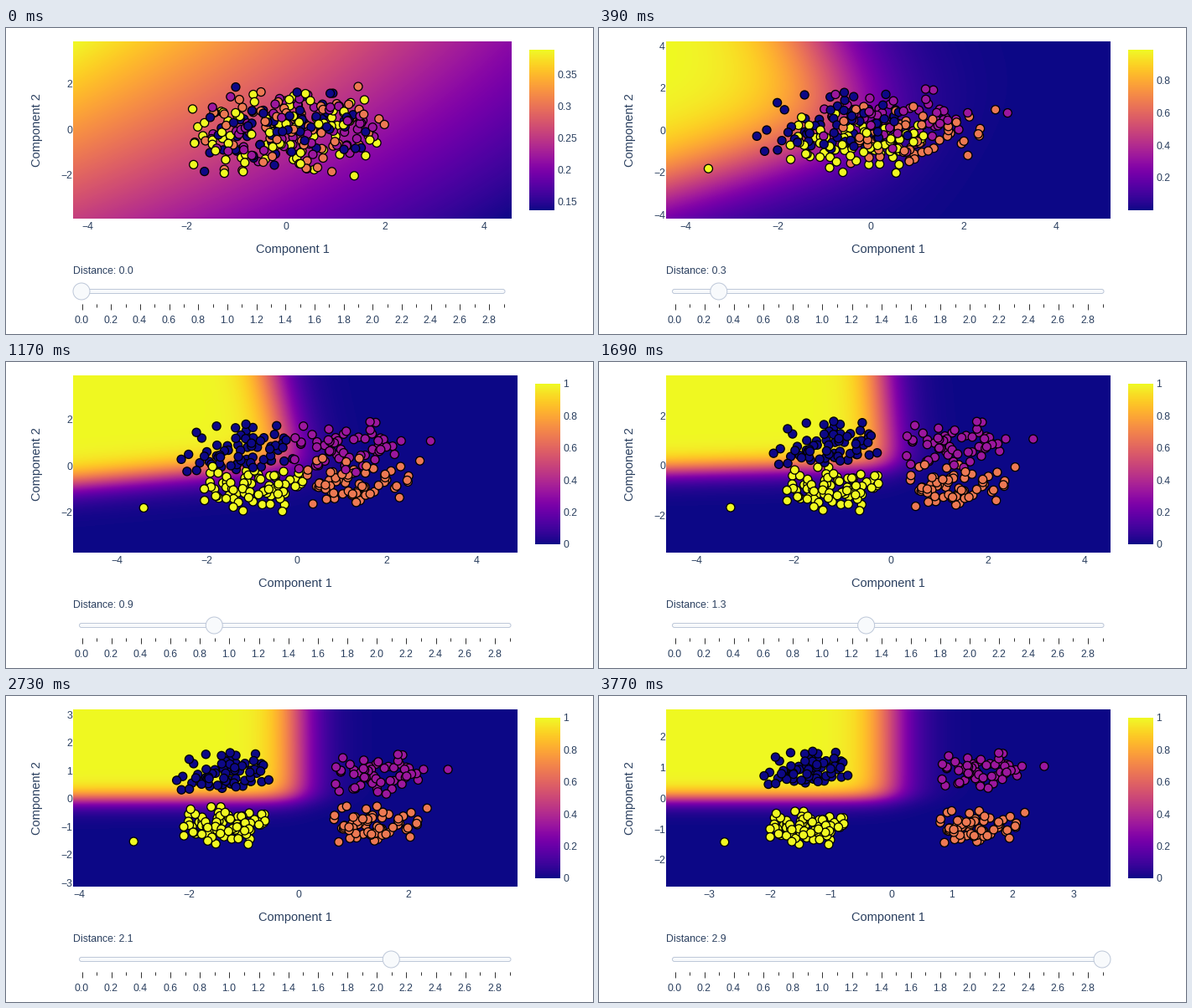
These frames come from a looping animation (700x366 px, 3900 ms). A matplotlib script:

```python
import numpy as np
import matplotlib.pyplot as plt
from matplotlib.animation import FuncAnimation
from matplotlib.patches import Circle, FancyBboxPatch

W, H, DPI = 700, 366, 100
PT = 72 / DPI
FRAMES, INTERVAL = 30, 130
LEFT, TOP, BOTTOM = 80, 16, 228
INK, RAIL, KNOB = "#2a3f5f", "#bec8d9", "#f8fafc"
CMAP = plt.get_cmap("plasma")
PER_CLASS = 70
BAR_TICKS, X_TICKS, Y_TICKS = 5.8, 7.625, 6.4

plt.rcParams["font.family"] = "Liberation Sans"

# Classes: navy, purple, orange, yellow
SIDE = np.array([-1, 1, 1, -1])
ROW = np.array([1, 1, -1, -1])


def view(d):
    """Pixel origin and pixels per unit of both axes."""
    at = [0, 0.3, 0.9, 1.7, 2.9]
    origin = [np.interp(d, at, [334, 324, 346.5, 349, 348.7]),
              np.interp(d, at, [121.5, 122.5, 124.5, 123.5, 122.5])]
    scale = [np.interp(d, at, [59.1, 55.2, 53.6, 62, 72.3]),
             np.interp(d, at, [27.3, 25.3, 27.8, 31.9, 36.7])]
    return np.array(origin), np.array(scale)


def means(d):
    """Class means after scaling to unit variance, slightly sheared."""
    d = max(d, 0.04)
    mix = d / np.sqrt(d * d + 0.45)
    shear = 10 * d * d * np.exp(-4.3 * d)
    x = 1.45 * mix * SIDE - shear * ROW
    y = 0.96 * mix * ROW + 0.6 * shear * SIDE
    return np.column_stack([x, y])


def spread(d):
    return 1 / (1 + np.array([0.62, 0.75]) * d)


def field(d, right):
    """Probability of the navy class on the pixel grid."""
    origin, scale = view(d)
    x = (np.arange(LEFT, right) + 0.5 - origin[0]) / scale[0]
    y = (origin[1] - np.arange(TOP, BOTTOM)[:, None] - 0.5) / scale[1]
    kx = 1.5 - 0.8 * np.exp(-3 * d)
    ky = 2 * np.sqrt(max(d, 0.3))
    logits = [kx * mx * (x - mx / 2) + ky * my * (y - my / 2)
              for mx, my in means(d)]
    return 1 / sum(np.exp(v - logits[0]) for v in logits)


rng = np.random.default_rng(12)
LABEL = rng.integers(0, 4, 4 * PER_CLASS)
COLORS = CMAP(LABEL / 3)


def cloud():
    return 2.2 * np.tanh(0.48 * rng.normal(size=(len(LABEL), 2)))


MIXED, NOISE = cloud(), cloud()
# One far point each for purple, orange and yellow
for label, far in [(1, (3.1, 0.35)), (2, (2.2, 1.5)), (3, (-3.75, -1.55))]:
    NOISE[np.argmax(LABEL == label)] = far


def ticks(lo, hi, count):
    """Round values between lo and hi, at most about count of them."""
    rough = (hi - lo) / count
    base = 10 ** np.floor(np.log10(rough))
    step = base * next(m for m in (1, 2, 5, 10) if rough <= m * base)
    tol = 3e-6
    return step * np.arange(np.ceil((lo - tol) / step),
                            np.floor((hi + tol) / step) + 1)


def fmt(v):
    return f"{round(v, 4) + 0:g}".replace("-", "\u2212")


fig = plt.figure(figsize=(W / DPI, H / DPI), dpi=DPI, facecolor="white")
ax = fig.add_axes([0, 0, 1, 1])


def text(x, y, label, ha="center", size=12.3):
    ax.text(x, y + 0.35 * size, label, ha=ha, va="baseline",
            size=size * PT, color=INK)


def image(data, x0, x1, y0, y1):
    ax.imshow(data, cmap=CMAP, extent=(x0, x1, y1, y0), aspect="auto",
              interpolation="nearest")


def draw_plot(d, img, right):
    image(img, LEFT, right, TOP, BOTTOM)
    (x0, y0), (kx, ky) = view(d)
    # Without any distance the principal axes are unrelated to the later ones
    noise = MIXED if d == 0 else NOISE
    pts = means(d)[LABEL] + noise * spread(d)
    ax.scatter(x0 + kx * pts[:, 0], y0 - ky * pts[:, 1], s=(10 * PT) ** 2,
               c=COLORS, edgecolors="black", linewidths=1.3 * PT, zorder=3)

    for v in ticks((LEFT - x0) / kx, (right - x0) / kx, X_TICKS):
        text(x0 + v * kx, 237, fmt(v))
    for v in ticks((y0 - BOTTOM) / ky, (y0 - TOP) / ky, Y_TICKS):
        text(79, y0 - v * ky, fmt(v), "right")
    text((LEFT + right) / 2, 264, "Component 1", size=14.6)
    ax.text(36.5, 122, "Component 2", rotation=90, ha="center", va="center",
            size=14.6 * PT, color=INK)


def draw_bar(lo, hi, marks, right):
    image(np.linspace(1, 0, 192)[:, None], right + 21, right + 51, 26, 218)
    for v in marks:
        text(right + 54.5, 218 - 192 * (v - lo) / (hi - lo), fmt(v), "left")


def draw_slider(i, right):
    text(80, 290, f"Distance: {i / 10:.1f}", "left")
    ax.add_patch(FancyBboxPatch(
        (90, 315), right - 100.5, 0, boxstyle="round,pad=2.5,rounding_size=2.5",
        fc=KNOB, ec=RAIL, lw=PT))
    pos = np.linspace(90, right - 10, FRAMES)
    for k, x in enumerate(pos):
        major = k % 2 == 0
        px = np.floor(x) + 0.5
        ax.plot([px, px], [330, 337 if major else 334], color="#333333",
                lw=PT, solid_capstyle="butt")
        if major:
            text(x, 348.5, f"{k / 10:.1f}")
    ax.add_patch(Circle((pos[i], 315), 10, fc=KNOB, ec=RAIL, lw=PT, zorder=4))


def draw(i):
    ax.clear()
    d = i / 10
    img = field(d, 610)
    lo, hi = img.min(), img.max()
    marks = ticks(lo, hi, BAR_TICKS)
    # Longer bar labels take room from the plot
    right = 603 if max(len(fmt(v)) for v in marks) > 3 else 610
    draw_plot(d, img[:, :right - LEFT], right)
    draw_bar(lo, hi, marks, right)
    draw_slider(i, right)
    ax.set_xlim(0, W)
    ax.set_ylim(H, 0)
    ax.axis("off")
    return []


anim = FuncAnimation(fig, draw, frames=FRAMES, interval=INTERVAL,
                     init_func=lambda: [], repeat=True, repeat_delay=0)
plt.show()
```
